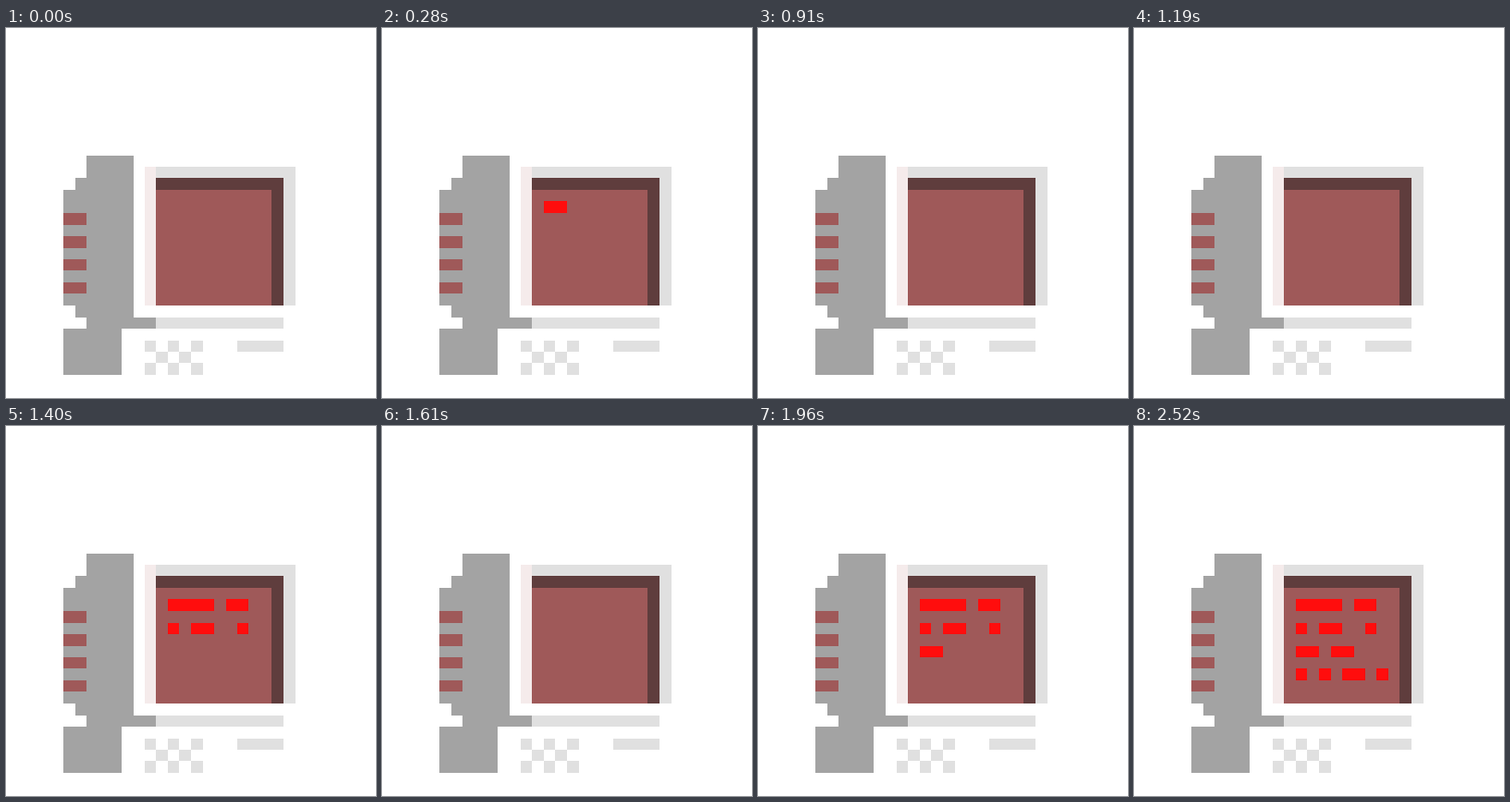
These frames come from a looping animation (400x400 px, 2.59 s). An HTML page with a canvas:

```html
<!DOCTYPE html>
<html lang="en">
<head>
<meta charset="utf-8">
<title>Pixel computer</title>
<style>
  html, body { margin: 0; width: 100%; height: 100%; overflow: hidden; background: #fff; }
  canvas { display: block; width: 100%; height: 100%; image-rendering: pixelated; }
</style>
</head>
<body>
<canvas id="stage" width="400" height="400"></canvas>
<script>
const ctx = document.getElementById('stage').getContext('2d');
const STEP = 70, STEPS = 37;
const GREY = '#a3a3a3', LIGHT = '#e0e0e0', PINK = '#f5ebeb';
const SCREEN = '#9f5959', SHADE = '#5f3d3d', GLOW = '#ff0d0d';

// Cells are 12.5 px wide; odd edges snap to whole pixels.
const snap = c => Math.round(c * 12.5 - (c & 4 ? 0.1 : 0));

function box(color, x, y, w = 1, h = 1) {
  const l = snap(x), t = snap(y);
  ctx.fillStyle = color;
  ctx.fillRect(l, t, snap(x + w) - l, snap(y + h) - t);
}

// One line of screen text per string, one lit cell per mark.
const lines = ['####.##', '#.##..#', '##.##', '#.#.##.#'];
const marks = lines.flatMap((line, row) =>
  [...line].flatMap((ch, col) => ch === '#' ? [{ x: 14 + col, row }] : []));

function drawComputer() {
  box('#fff', 0, 0, 32, 32);

  box(GREY, 7, 11, 4, 14);
  box(GREY, 6, 13, 5, 12);
  box(GREY, 5, 14, 6, 10);
  box(GREY, 7, 25, 6, 1);
  box(GREY, 5, 26, 5, 4);
  for (let y = 16; y < 24; y += 2) box(SCREEN, 5, y, 2);

  box(LIGHT, 13, 12, 12, 12);
  box(PINK, 12, 12, 1, 12);
  box(SHADE, 13, 13, 11, 11);
  box(SCREEN, 13, 14, 10, 10);

  box(LIGHT, 13, 25, 11);
  box(LIGHT, 20, 27, 4);
  for (let y = 0; y < 3; y++)
    for (let x = y % 2; x < 5; x += 2) box(LIGHT, 12 + x, 27 + y);
}

// Number of lit marks: flickering typing first, then steady typing.
function litCount(i) {
  if (i <= 2) return i;
  if (i < 28) return i % 2 ? 0 : Math.min(12, i / 2);
  if (i < 30) return 12;
  if (i < 33) return Math.min(14, i - 17);
  return [15, 16, 18, 19][i - 33];
}

function draw(i) {
  drawComputer();
  for (const { x, row } of marks.slice(0, litCount(i))) {
    const drop = row === 2 && i < 28 ? 1 : 0;
    box(GLOW, x, 15 + row * 2 + drop);
  }
}

const start = performance.now();
function tick() {
  const t = performance.now() - start;
  draw(Math.floor(t / STEP) % STEPS);
  requestAnimationFrame(tick);
}
tick();
</script>
</body>
</html>
```
